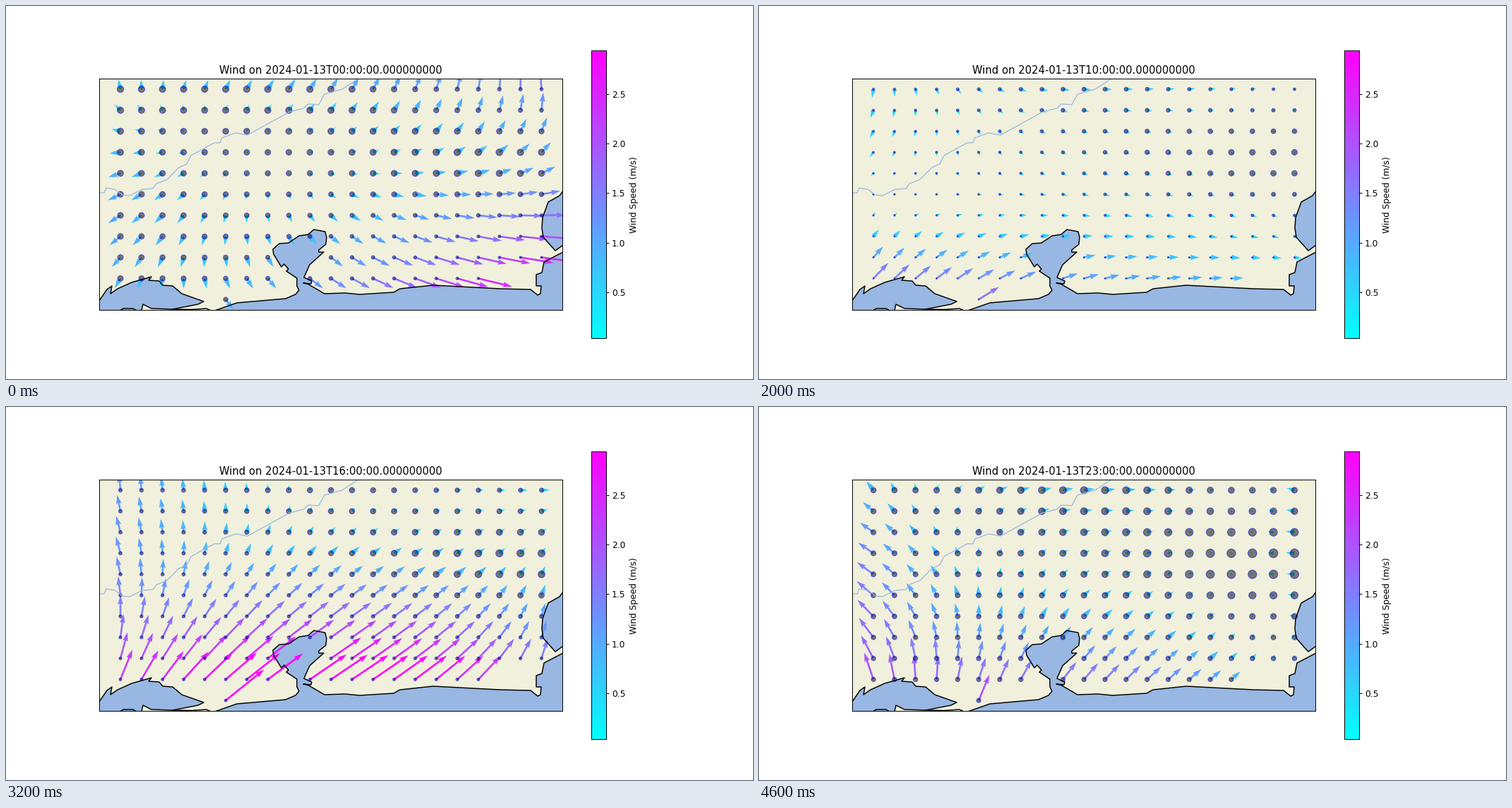
A matplotlib script that plays this animation: 1058x529 px, repeating every 4.8 s.

```python
import numpy as np
import matplotlib.pyplot as plt
from matplotlib.animation import FuncAnimation
from matplotlib.cm import ScalarMappable
from matplotlib.colors import Normalize

W, H = 1058, 529
DPI = 88.1666667        # 12 x 6 inches fill the stage
LEFT, TOP, WIDTH, HEIGHT = 132.25, 103.1, 656, 328
CELL = WIDTH / 22
PX_PER_MS = 20          # arrow pixels per m/s
DRAG = -12 - 7j         # slows the wind between the two edges
LAND, WATER = "#f0f0dc", "#98b7e2"

# Key winds as u + vj in pixels: north edge (west, middle, east), then south edge
KEY_WINDS = {
    0: (-3 + 14j, 10 + 16j, -2 + 31j, -8 - 14j, 22 - 14j, 60 - 10j),
    3: (-10 + 1j, 12 - 3j, -1 + 18j, 2 + 2j, 26 - 6j, 48 - 6j),
    7: (-8 - 1j, 6 + 1j, 0 + 18j, 16 + 2j, 18 - 16j, 30 - 3j),
    10: (-2 - 12j, 10 - 1j, 2 + 1j, 21 + 22j, 21 + 6j, 14 + 0j),
    14: (1 + 24j, 0 - 6j, 14 - 5j, 20 + 36j, 56 + 32j, -6 + 24j),
    18: (-5 + 24j, 3 + 15j, 9 + 6j, 14 + 48j, 48 + 38j, 28 + 42j),
    23: (-10 + 13j, 15 + 2j, -11 + 3j, -13 + 38j, 20 + 23j, 2 + 6j),
}

# Stations: all land cells of a 21 x 11 grid
row, col = np.indices((11, 21))
on_land = ((row < 8)
           | (row == 8) & (abs(col - 8.5) > 1)
           | (row == 9) & (col != 8) & (col < 18)
           | (row == 10) & (col == 5))
row, col = row[on_land], col[on_land]
x = LEFT + CELL * (col + 1)
y = H - (TOP + CELL * (row + .5))
east, south = col / 20, row / 9


def wind(hour):
    """Parabola along each edge, blended from north to south."""
    keys = np.array(list(KEY_WINDS.values())).T
    now = [np.interp(hour, list(KEY_WINDS), key) for key in keys]
    ends = (2 * (east - .5) * (east - 1), 4 * east * (1 - east),
            2 * east * (east - .5))
    upper = sum(w * k for w, k in zip(now[:3], ends))
    lower = sum(w * k for w, k in zip(now[3:], ends))
    drag = DRAG * 4 * south * (1 - south) * (1 - east / 2)
    return upper + (lower - upper) * south + drag


def bump(cx, cy, wx, wy):
    return np.exp(-((east - cx) / wx) ** 2 - ((south - cy) / wy) ** 2)


def dot_radius(hour):
    base = np.interp(hour, [0, 3, 10, 23], [3.6, 1.5, 1.9, 4.1])
    west = max(0, 1 - hour / 3) * 2.6 * (.5 - east)
    return (base + west - .6 * south + 2.8 * bump(.95, .38, .4, .25)
            + 1.2 * bump(.5, 0, .3, .3))


# Outlines in pixels from the top left
bay = [(297, 431.5), (327, 421), (396, 415), (410, 409), (415, 403), (412, 397),
       (412, 386), (397, 376), (400, 373), (394, 366), (390, 370), (379, 352),
       (378, 345), (387, 337), (400, 336), (415, 326), (428, 324), (436, 317),
       (452, 320), (454, 328), (453, 338), (443, 346), (443, 349), (450, 349),
       (430, 367), (422, 385), (433, 390), (432, 394), (421, 393)]
shore = [(427, 394), (441, 402), (451, 408), (480, 407), (501, 409), (549, 406),
         (558, 401), (605, 396), (700, 401), (743, 402), (753, 410), (757, 408),
         (758, 397), (751, 397), (751, 381), (759, 378), (762, 363), (789, 349)]
inlet = [(789, 262), (784, 269), (768, 278), (760, 300), (759, 315), (761, 328),
         (778, 347), (789, 339)]
lagoon = [(132, 418), (143, 402), (150, 397), (148, 408), (158, 401), (178, 392),
          (206, 384), (202, 389), (217, 390), (222, 396), (236, 397), (249, 408),
          (280, 419), (272, 423), (236, 430), (206, 429), (194, 423), (192, 431.5)]
spits = [[(162, 431.5), (166, 429), (180, 429), (184, 431.5)],
         [(236, 430), (262, 430.5), (284, 429), (289, 431.5)]]
river = [(132, 265), (139, 265), (142, 258), (154, 260), (165, 268), (175, 269),
         (193, 260), (208, 259), (213, 252), (228, 246), (245, 229), (256, 224),
         (262, 212), (295, 194), (303, 194), (306, 187), (325, 180), (342, 183),
         (402, 150), (422, 145), (428, 139), (443, 140), (451, 125), (476, 118),
         (499, 103)]

fig = plt.figure(figsize=(12, 6), dpi=DPI, facecolor="white")
ax = fig.add_axes([LEFT / W, 1 - (TOP + HEIGHT) / H, WIDTH / W, HEIGHT / H],
                  facecolor=LAND)
ax.set(xlim=(LEFT, LEFT + WIDTH), ylim=(H - TOP - HEIGHT, H - TOP),
       xticks=[], yticks=[])
title = ax.set_title("")


def line(points, color="black", width=1.2):
    px, py = np.array(points).T
    ax.plot(px, H - py, color=color, lw=width, zorder=1.5)


def sea(points, *corners):
    px, py = np.array(points + list(corners)).T
    ax.fill(px, H - py, color=WATER, lw=0, zorder=-1)
    line(points)


sea(bay + shore, (789, 432))
sea(inlet)
sea(lagoon, (132, 432))
for spit in spits:
    line(spit)
line(river, WATER, 1)

norm = Normalize(.038, 2.938)
calm = np.ones(x.size)
arrows = ax.quiver(x, y, calm, calm, calm, cmap="cool", norm=norm, angles="uv",
                   scale_units="xy", scale=1, width=.06 / 15.2, zorder=1)
dots = ax.scatter(x, y, s=1, color="black", edgecolor="blue", alpha=.5,
                  linewidths=1, zorder=1.1)

bar_ax = fig.add_axes([.78375, .11, .01925, .77])
fig.colorbar(ScalarMappable(norm, "cool"), cax=bar_ax, label="Wind Speed (m/s)")


def update(hour):
    w = wind(hour)
    arrows.set_UVC(w.real, w.imag, abs(w) / PX_PER_MS)
    inner = np.maximum(dot_radius(hour) - .4, .3)
    dots.set_sizes((2 * inner * 72 / DPI) ** 2)
    title.set_text(f"Wind on 2024-01-13T{hour:02d}:00:00.000000000")
    return arrows, dots, title


anim = FuncAnimation(fig, update, frames=24, interval=200, repeat=True,
                     repeat_delay=0, blit=False)
plt.show()
```
